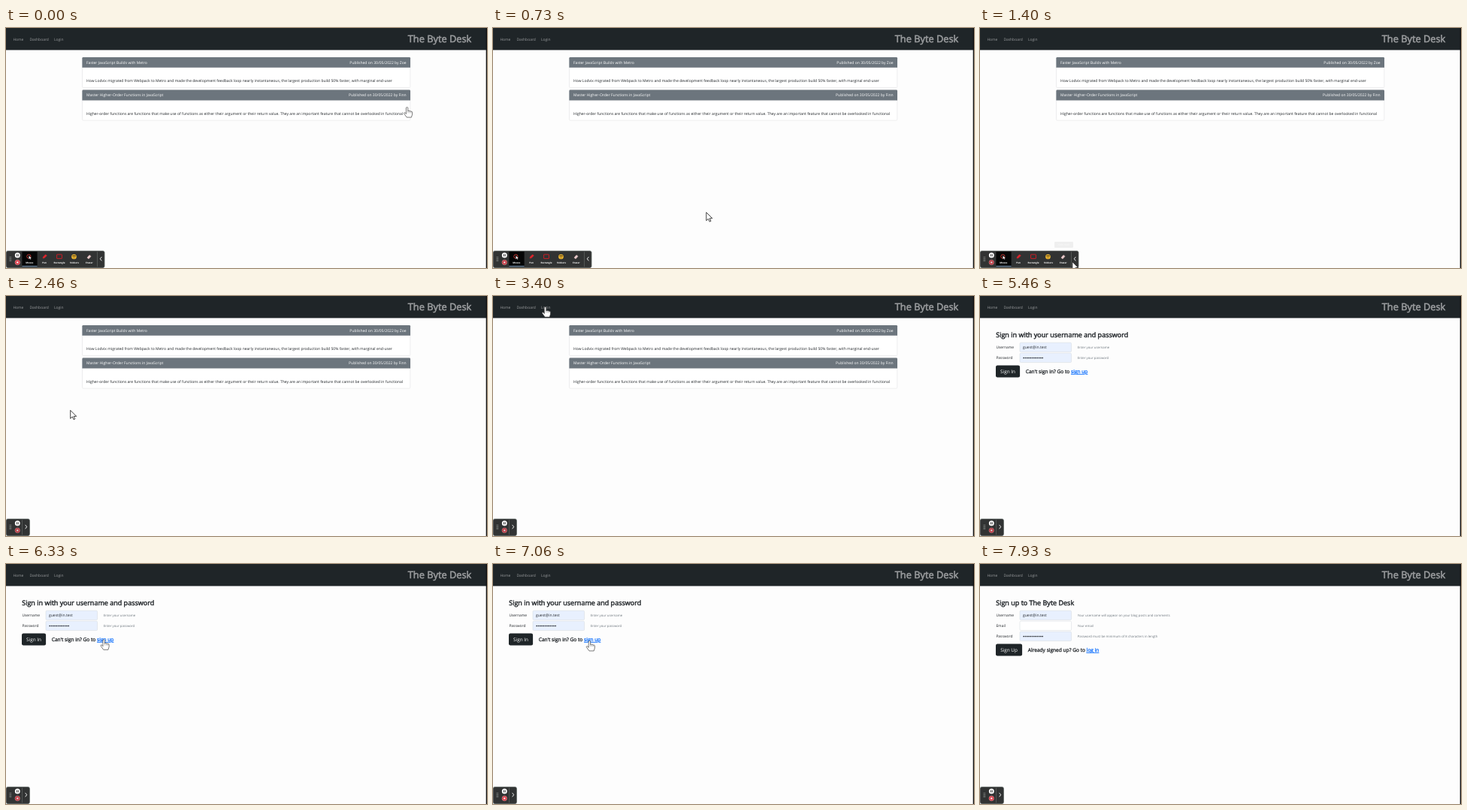
Write an HTML page that moves like this. It is 640 by 320 pixels and loops after 8 s.

```html
<!DOCTYPE html>
<html lang="en">
<head>
<meta charset="utf-8">
<title>Blog walkthrough</title>
<style>
  html, body { margin: 0; width: 100%; height: 100%; overflow: hidden; background: #fdfdfd; }
  svg { display: block; width: 640px; height: 320px; }
  text { font-family: "Open Sans", "Noto Sans", sans-serif; text-rendering: geometricPrecision; white-space: pre; }
</style>
</head>
<body>
<svg id="stage" viewBox="0 0 640 320"></svg>
<script>
const LOOP = 8000, FPS = 15;
const INK = '#212529', BAR = '#1f2528', MUTED = '#6c757d', NAV = '#9a9c9e', LINK = '#0d6efd';
const SITE = 'The Byte Desk';

const text = (x, y, str, size = 5.02, fill = INK, extra = '') =>
  `<text x="${x}" y="${y}" font-size="${size}" fill="${fill}" ${extra}>${str}</text>`;
// Medium weight: the regular face with a hairline outline
const medium = (color, size) => `stroke="${color}" stroke-width="${size * .045}"`;
const rect = (x, y, w, h, fill, r = 0, extra = '') =>
  `<rect x="${x}" y="${y}" width="${w}" height="${h}" rx="${r}" fill="${fill}" ${extra}/>`;
const path = (d, stroke, width, fill = 'none') =>
  `<path d="${d}" stroke="${stroke}" stroke-width="${width}" fill="${fill}" stroke-linejoin="round"/>`;
const group = (id, body) => `<g id="${id}" style="display:none">${body}</g>`;

// Pages
const navbar = rect(0, 0, 640, 29.4, BAR)
  + text(9.4, 16.7, 'Home', 4.95, NAV)
  + text(31.4, 16.7, 'Dashboard', 4.95, NAV)
  + text(64, 16.7, 'Login', 4.95, NAV)
  + text(619.3, 18.6, SITE, 12.8, NAV, `text-anchor="end" ${medium(NAV, 12.8)}`);

const card = (y, title, author, body) =>
  rect(101.6, y + .2, 436.2, 40.4, '#fff', 1.3, 'stroke="#dcdddf" stroke-width=".5"')
  + `<path d="M101.4 ${y + 13.8}v-12.5q0-1.3 1.3-1.3h434q1.3 0 1.3 1.3v12.5z" fill="${MUTED}"/>`
  + text(107, y + 8.6, title, 5.02, '#fff')
  + text(532.6, y + 8.6, `Published on 30/05/2022 by ${author}`, 5.02, '#fff', 'text-anchor="end"')
  + text(107, y + 32.9, body, 5.02);

const blog = card(39, 'Faster JavaScript Builds with Metro', 'Zoe',
    'How Lodvix migrated from Webpack to Metro and made the development feedback loop nearly instantaneous, the largest production build 50% faster, with marginal end-user')
  + card(82.6, 'Master Higher-Order Functions in JavaScript', 'Finn',
    'Higher-order functions are functions that make use of functions as either their argument or their return value. They are an important feature that cannot be overlooked in functional');

const dots = y => Array.from({ length: 12 }, (_, i) =>
  `<circle cx="${58.2 + i * 2.27}" cy="${y}" r=".85" fill="${INK}"/>`).join('');

const field = (y, [label, hint], filled) => {
  const auto = filled && label !== 'Email';
  const value = !auto ? '' : label === 'Password' ? dots(y + .1) : text(57, y + 1.6, 'guest@in.test');
  return text(21.4, y + 1.8, label, 4.92)
    + rect(53, y - 6.2, 68.6, 12.4, auto ? '#e8f0fe' : '#fff', 1.4, 'stroke="#d3d8dd" stroke-width=".5"')
    + value + text(129.7, y + 1.5, hint, 4.31, MUTED);
};

const form = ({ title, fields, button, buttonWidth, prompt, link }, filled) => {
  const y = 68.4 + fields.length * 14;
  const linkSpan = `<tspan fill="${LINK}" stroke="${LINK}" text-decoration="underline">${link}</tspan>`;
  return text(21.2, 54.5, title, 9.03, INK, medium(INK, 9.03))
    + fields.map((f, i) => field(68.4 + i * 14, f, filled)).join('')
    + rect(21, y - 3.9, buttonWidth, 16, BAR, 2.2)
    + text(21 + buttonWidth / 2, y + 6.6, button, 6.4, '#fff', 'text-anchor="middle"')
    + text(28.7 + buttonWidth, y + 6.6, prompt + linkSpan, 6.6, INK, medium(INK, 6.6));
};

const signIn = {
  title: 'Sign in with your username and password',
  fields: [['Username', 'Enter your username'], ['Password', 'Enter your password']],
  button: 'Sign In', buttonWidth: 32.1, prompt: "Can't sign in? Go to ", link: 'sign up'
};
const signUp = {
  title: `Sign up to ${SITE}`,
  fields: [['Username', 'Your username will appear on your blog posts and comments'],
    ['Email', 'Your email'], ['Password', 'Password must be minimum of 8 characters in length']],
  button: 'Sign Up', buttonWidth: 35.1, prompt: 'Already signed up? Go to ', link: 'log in'
};

// Recorder toolbar
const panel = width =>
  rect(-.5, 296.6, width + 1.9, 23.6, '#9fb0a8', 3, 'opacity=".45"')
  + rect(.5, 297.5, width + .2, 21.9, '#313333', 2, 'stroke="#454948" stroke-width=".7"');
const grip = [0, 1, 2, 3].map(i => rect(4.4, 305.3 + i * 1.7, 2.9, .7, '#8a8e8c')).join('');
const controls = grip
  + '<circle cx="15.3" cy="303" r="3.5" fill="#fff"/>'
  + rect(13.9, 301.5, .9, 3, '#222') + rect(15.8, 301.5, .9, 3, '#222')
  + '<g id="record"><circle cx="15.3" cy="312.5" r="3.3" fill="#dc3c48" stroke="#f0a5aa" stroke-width=".5"/>'
  + rect(14.2, 311.4, 2.2, 2.2, '#fff', .3) + '</g>';
const chevron = (x, dir) => path(`M${x + dir} 305.2l${-2 * dir} 2.6l${2 * dir} 2.6`, '#fff', .9);

const icons = [
  '<circle cx="30.4" cy="304.6" r="2.6" fill="none" stroke="#d33a35" stroke-width=".9"/>'
    + path('M30.4 303.6v4.6l1.2-1 .9 1.6.8-.4-.8-1.5h1.5z', '#222', .3, '#fff'),
  path('M49 307l.6-2 3-3 1.6 1.6-3 3z', '#e0262d', .6, '#e0262d'),
  rect(67.6, 302, 6.8, 5.4, 'none', .3, 'stroke="#c91f26" stroke-width="1"'),
  '<circle cx="90.5" cy="305" r="3.3" fill="#f4bd32"/>' + rect(88.3, 303.3, 4.6, 1.2, '#4b3411', .4)
    + path('M88.9 306q1.6 1.6 3.2 0', '#5b3a10', .6),
  path('M108 306.2l3-3.4 2 1.6-3 3.4z', '#d9b3b3', .7, '#e7cccc')
];
const tools = ['Mouse', 'Pen', 'Rectangle', 'Stickers', 'Eraser'].map((name, i) =>
  icons[i] + text(31.2 + i * 19.9, 314, name, 3.05, '#fff', 'text-anchor="middle" font-weight="700"')).join('');

const expanded = panel(130.2) + rect(21.4, 298.2, 20.2, 20.2, '#050606')
  + rect(21.4, 317.2, 20.2, 1, '#7fa2c4') + controls + tools
  + rect(121.2, 298.4, .6, 20, '#6a6e6c') + chevron(126.3, 1);
const collapsed = panel(30.6) + rect(21.3, 298.4, .6, 20, '#6a6e6c')
  + controls.replace('id="record"', 'id="recordSmall"') + chevron(26.7, -1);
const tooltip = rect(99, 285, 25, 8, '#efefef', 1)
  + text(111.5, 290.2, 'Hide tools', 3.4, '#fafafa', 'text-anchor="middle"');

// Pointers, with the hot spot at 0,0
const hand = path('M-1.2 1.2a1.2 1.2 0 0 1 2.4 0V5.2a1.1 1.1 0 0 1 2.1.3a1.1 1.1 0 0 1 2 .5a1 1 0 0 1 1.7.8V9.5L5.8 13.5H-.4L-3.9 8.6C-4.6 7.5-3.2 6.6-2.3 7.6L-1.2 8.9Z', '#333', .65, '#fff')
  + path('M1.2 5.2v2.4M3.3 5.6v2.2M5.3 6v2', '#444', .4);
const arrow = path('M0 0V11L2.6 8.6 4.4 12.4 6.1 11.6 4.4 8H8Z', '#111', .8, '#fff');

const stage = document.getElementById('stage');
stage.innerHTML = rect(0, 0, 640, 320, '#fdfdfd') + navbar
  + group('blog', blog)
  + group('signIn', form(signIn, false)) + group('signInFilled', form(signIn, true))
  + group('signUp', form(signUp, false)) + group('signUpFilled', form(signUp, true))
  + rect(638.7, 0, 1.3, 320, '#111')
  + group('tooltip', tooltip) + group('expanded', expanded) + group('collapsed', collapsed)
  + group('hand', hand) + group('arrow', arrow);

// Timeline: hard changes
const pages = [[0, 'blog'], [3660, 'signIn'], [4330, 'signInFilled'], [7260, 'signUp'], [7530, 'signUpFilled']];
const bars = [[0, 'expanded'], [1530, 'collapsed']];
const tips = [[0, ''], [1060, 'tooltip'], [1530, '']];
const pointers = [[0, 'hand'], [400, 'arrow'], [2860, 'hand'], [4530, 'arrow'], [5260, ''],
  [5600, 'arrow'], [5930, 'hand'], [7330, 'arrow'], [7860, '']];

// Pointer track: time, x, y
const track = [
  [0, 533.6, 105.6], [230, 533.6, 105.6], [400, 500, 136], [660, 330, 226], [930, 160, 299],
  [1060, 124, 311], [1400, 122.8, 311.6], [1770, 122.8, 311.6], [1930, 132, 290],
  [2130, 112, 224], [2330, 91, 168], [2460, 86, 155], [2600, 80, 100], [2860, 70, 24],
  [3060, 69.5, 14.6], [4330, 69.5, 14.6], [4530, 82, 32], [4860, 118, 62], [5200, 128, 72],
  [5600, 124, 76], [5930, 129, 98], [6200, 131, 100], [6600, 128.4, 102.4], [7260, 128.4, 102.4],
  [7460, 140, 108], [7730, 150, 114.5], [8000, 150, 114.5]
];

const current = (steps, t) => steps.filter(s => s[0] <= t).pop()[1];

function pointAt(t) {
  const i = Math.max(1, track.findIndex(p => p[0] > t));
  const [t0, x0, y0] = track[i - 1], [t1, x1, y1] = track[i];
  const k = (t - t0) / (t1 - t0);
  return [x0 + (x1 - x0) * k, y0 + (y1 - y0) * k];
}

const el = id => document.getElementById(id);
const layers = [pages, bars, tips, pointers].map(steps =>
  ({ steps, ids: [...new Set(steps.map(s => s[1]))].filter(Boolean) }));

function draw(t) {
  for (const { steps, ids } of layers) {
    const active = current(steps, t);
    ids.forEach(id => { el(id).style.display = id === active ? '' : 'none'; });
  }
  const at = `translate(${pointAt(t).join(' ')})`;
  el('hand').setAttribute('transform', at);
  el('arrow').setAttribute('transform', at);
  const glow = .9 + .1 * Math.cos(t / LOOP * 16 * Math.PI);
  el('record').style.opacity = el('recordSmall').style.opacity = glow;
}

function tick() {
  const t = performance.now() % LOOP;
  draw(Math.min(Math.floor((t + 6.7) * FPS / 1000) * 1000 / FPS, LOOP - 1));
  requestAnimationFrame(tick);
}
tick();
</script>
</body>
</html>
```
